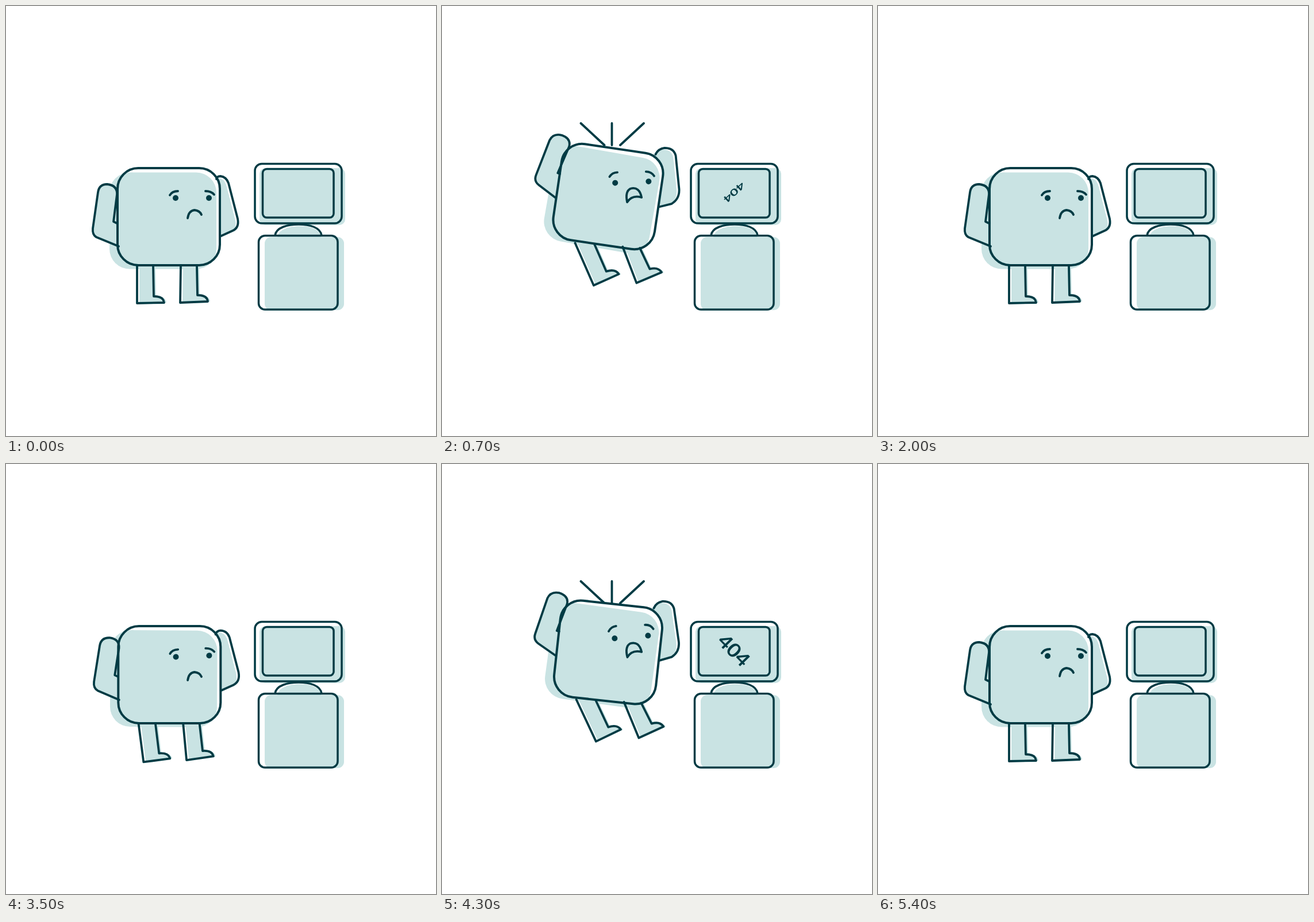
Animation, 748 px wide and 748 px high, one loop 6830 ms. Source, as an HTML page:

```html
<!DOCTYPE html>
<html lang="en">
<head>
<meta charset="utf-8">
<title>404</title>
<style>
  html, body { margin: 0; width: 100%; height: 100%; overflow: hidden; background: #fff; }
  svg { display: block; width: 100vw; height: 100vh; }
  .fill { fill: #c9e3e3; }
  .line { fill: none; stroke: #003b44; stroke-width: 3.8; stroke-linecap: round; stroke-linejoin: round; }
  .thin { stroke-width: 3.5; }
  .ink { fill: #003b44; }
  text { font: 700 42px Lato, "Open Sans", sans-serif; text-anchor: middle; fill: #003b44; }
</style>
</head>
<body>
<svg viewBox="0 0 748 748">
  <g id="computer">
    <rect class="fill" x="441" y="282" width="149" height="99" rx="10"/>
    <path class="fill" d="M472 402C474 388 494 383 511 383C530 383 546 388 548 402Z"/>
    <rect class="fill" x="450" y="402" width="138" height="127" rx="11"/>
    <rect class="line thin" x="433" y="274.500" width="151" height="103.500" rx="12"/>
    <rect class="line thin" x="446.500" y="283.500" width="123.500" height="84.500" rx="7"/>
    <path class="line thin" d="M468 399C470 385 490 380 509 380C528 380 547 385 549 399"/>
    <rect class="line thin" x="439.500" y="399.500" width="137.500" height="128.500" rx="11"/>
  </g>
  <g id="label">
    <text y="15">404</text>
    <text y="15">404</text>
    <text y="15">404</text>
  </g>
  <g id="rays" class="line"><path/></g>
  <g id="hero">
    <g id="fills"></g>
    <g id="body">
      <rect x="-89" y="-84.500" width="178" height="169" rx="36" fill="#fff"/>
      <rect id="shade" class="fill" x="-103" y="-77" width="186" height="168" rx="35"/>
    </g>
    <g id="lines"></g>
    <g id="edge"><rect class="line" x="-89" y="-84.500" width="178" height="169" rx="36" style="stroke-width:4"/></g>
    <g class="eye"><circle class="ink" r="5"/><path class="line"/></g>
    <g class="eye"><circle class="ink" r="5"/><path class="line"/></g>
    <path class="line" id="mouth"/>
  </g>
</svg>
<script>
const LOOP = 6830, REPEAT = 3400;
const $ = id => document.getElementById(id);
const set = (el, name, value) => el.setAttribute(name, value);
const mix = (a, b, k) => a + (b - a) * k;

// Limbs: calm shape, scared shape, fill offset, extra turn per degree of tilt
const limbs = [
  { calm: 'M196 418L157 402Q150 398 151 387L160 324Q162 310 176 310Q194 312 193 328L187 375L193 378',
    scared: 'M198 346L167 328Q157 322 160 311L176 248Q181 235 196 237Q213 241 211 255L197 303L201 304',
    fill: [0, 1], turn: .1 },
  { calm: 'M366 301Q367 296 373 296Q383 297 387 308L403 370Q406 386 394 391L372 401',
    scared: 'M362 250Q365 240 376 237Q392 235 397 248L410 305Q413 322 400 332L379 340',
    fill: [-4, 3], turn: .1 },
  { calm: 'M228 452L228 517L275 516Q274 505 257 505L256 452',
    scared: 'M238 418L276 489L318 466Q311 457 296 463L272 418',
    fill: [4, 0], turn: -.3 },
  { calm: 'M304 452L303 516L351 514Q350 503 333 503L332 452',
    scared: 'M321 418L350 479L392 457Q385 448 371 453L351 418',
    fill: [4, 0], turn: -.3 }
];

// Eyes: calm and scared position, brow drawn around the eye
const eyes = [
  { at: [[295, 334], [298.5, 308]], brow: ['M-10 -5Q-6 -12 4 -12', 'M-12 -15Q-9 -24 -1 -27'] },
  { at: [[353, 334], [356, 299]], brow: ['M-6 -12Q4 -12 9 -6', 'M-7 -22Q2 -24 8 -16'] }
];

const mouths = [
  'M316 369Q318 356 328 355Q337 356 340 363',
  'M323 339Q317 321 326 315Q341 309 347 328Q330 325 323 339Z'
];

function morph([a, b], k) {
  const number = /-?\d+/g, to = b.match(number);
  let i = 0;
  return a.replace(number, n => mix(+n, +to[i++], k).toFixed(2) + ' ');
}

function addPath(parent, cls) {
  const path = document.createElementNS('http://www.w3.org/2000/svg', 'path');
  set(path, 'class', cls);
  return parent.appendChild(path);
}

for (const limb of limbs) {
  limb.line = addPath($('lines'), 'line');
  limb.shade = addPath($('fills'), 'fill');
}
document.querySelectorAll('.eye').forEach((el, i) => eyes[i].el = el);

const track = (...keys) => t => {
  const i = keys.findIndex(key => key[0] > t);
  if (i === 0) return keys[0][1];
  if (i < 0) return keys[keys.length - 1][1];
  const [t0, a] = keys[i - 1], [t1, b] = keys[i];
  return mix(a, b, (t - t0) / (t1 - t0));
};

const fear = track([30, 0], [350, 1], [1300, 1], [1430, .3], [1600, 0]);
const frown = track([30, 0], [500, .4], [700, .45], [1300, 1], [1600, 0]);
const lift = track([100, 0], [500, -21], [700, -35], [1000, -41], [1300, -33.5], [1430, -29], [1650, 0]);
const tilt = track([100, 0], [400, 8], [500, 8.4], [700, 8.4], [1300, 2], [1500, 0]);
const rayLength = track([200, 0], [400, 1], [1300, 1], [1400, .2], [1430, 0]);
const rayTop = track([500, 206], [700, 204], [1100, 204], [1300, 206]);
const settle = track([700, 0], [1000, 1]);

function drawHero(t) {
  const k = fear(t), cx = mix(283, 289, k), cy = mix(366.5, 333, k);
  const lean = tilt(t) - 2 * k;
  set($('hero'), 'transform',
    `translate(0 ${lift(t) + 33.5 * k}) rotate(${lean} ${cx} ${cy})`);
  for (const id of ['body', 'edge']) {
    set($(id), 'transform', `translate(${cx} ${cy}) rotate(${2 * k})`);
  }
  set($('shade'), 'transform', `rotate(${1.5 * k})`);
  for (const { calm, scared, fill, turn, line, shade } of limbs) {
    const d = morph([calm, scared], k);
    const swing = `rotate(${turn * lean} ${cx} ${cy})`;
    set(line, 'd', d);
    set(line, 'transform', swing);
    set(shade, 'd', d);
    set(shade, 'transform', `${swing} translate(${fill})`);
  }
  for (const { at: [a, b], brow, el } of eyes) {
    set(el, 'transform', `translate(${mix(a[0], b[0], k)} ${mix(a[1], b[1], k)})`);
    set(el.lastElementChild, 'd', morph(brow, frown(t)));
  }
  set($('mouth'), 'd', mouths[k > .4 ? 1 : 0]);
}

function drawRays(t) {
  const k = rayLength(t), foot = rayTop(t) + 38;
  const ray = (x, dx) => `M${x} ${foot}l${dx * k} ${-38 * k}`;
  set($('rays').firstElementChild, 'd',
    k > 0 ? ray(282.5, -41) + ray(295.5, 0) + ray(310, 41) : '');
}

function drawLabel(t) {
  const rows = [...$('label').children];
  const shown = t >= 200 && t < 2000, tripled = t < 600;
  rows.forEach((row, i) => {
    row.style.display = shown && (tripled || i === 0) ? '' : 'none';
    row.style.letterSpacing = tripled ? '3px' : '0';
    if (tripled) {
      set(row, 'transform',
        `translate(510 ${309 + 15.3 * i}) skewY(-12) skewX(-38) scale(1.4 .34)`);
    }
  });
  if (!tripled) {
    const k = settle(t);
    set(rows[0], 'transform',
      `translate(508 324) rotate(${137 * (1 - k)}) scale(${mix(.6, 1, k)} ${mix(.38, 1, k)})`);
  }
}

// Poses change at the start of each tenth of a second and 30 ms later
function snap(t) {
  const base = Math.floor(t / 100) * 100;
  return t - base < 30 ? base : base + 30;
}

function draw(now) {
  const time = snap(now % LOOP);
  const t = time < REPEAT ? time : time - REPEAT;
  drawHero(t);
  drawRays(t);
  drawLabel(t);
}

const start = performance.now();
function tick() {
  draw(performance.now() - start);
  requestAnimationFrame(tick);
}
tick();
</script>
</body>
</html>
```
